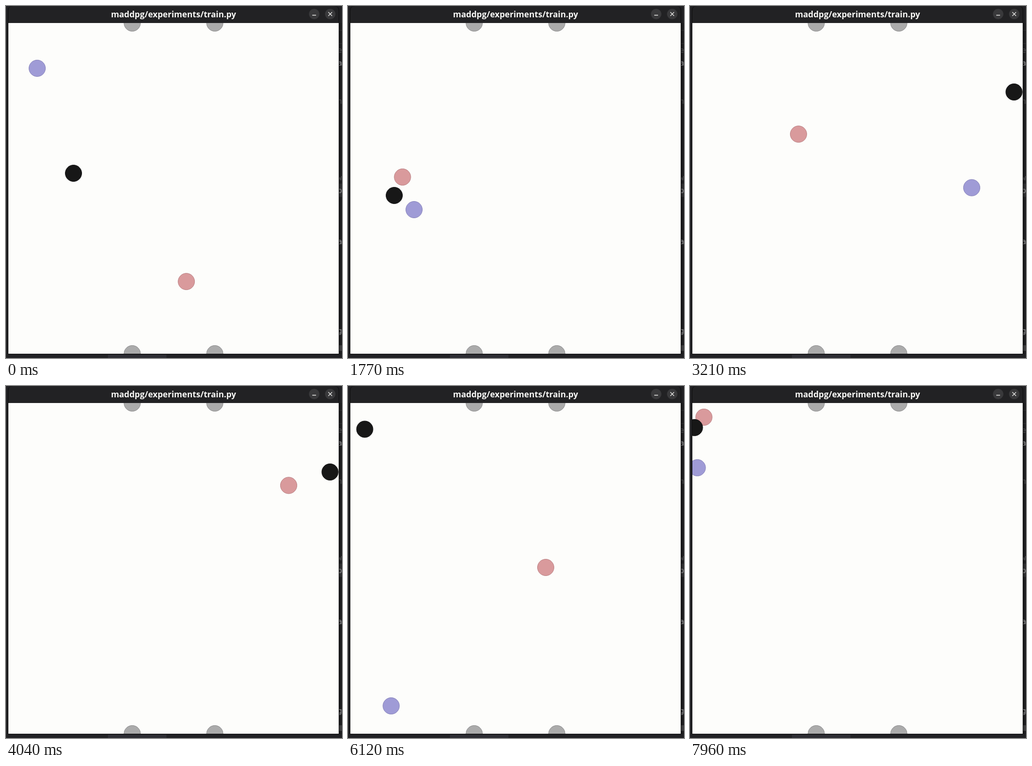
Recreate the animation shown at these times as an HTML page. Size 712 px wide and 745 px high, loop 8000 ms.

```html
<!DOCTYPE html>
<html lang="en">
<head>
<meta charset="utf-8">
<title>train.py</title>
<style>
  html, body { margin: 0; width: 100%; height: 100%; overflow: hidden; background: #212124; }
  svg { display: block; width: 712px; height: 745px; }
  .title { font: bold 17.6px "Open Sans", "Noto Sans", sans-serif; fill: #f7f7f5; text-anchor: middle; }
  .code { font: 15px "DejaVu Sans Mono", monospace; }
  .icon { stroke: #f2f2f0; stroke-width: 1.3; fill: none; }
</style>
</head>
<body>
<svg viewBox="0 0 712 745" xmlns="http://www.w3.org/2000/svg">
  <defs>
    <clipPath id="view"><rect x="5" y="36" width="700" height="700"/></clipPath>
  </defs>
  <rect width="712" height="745" fill="#212124"/>
  <rect x="706" y="36" width="6" height="701" fill="#1c1c1e"/>
  <rect x="706" y="376" width="6" height="28" fill="#2a2a2c"/>
  <rect x="706" y="718" width="6" height="12" fill="#3a3a3c"/>
  <path d="M706 51.5h6M706 79.5h6" stroke="#303032"/>
  <rect x="216" y="738" width="124" height="7" fill="#2d2d33"/>
  <g id="code" class="code"></g>

  <path d="M4 737V10Q4 0 14 0H696Q706 0 706 10V737Z" fill="#0b0b0c"/>
  <path d="M5 36V10Q5 0 15 0H695Q705 0 705 10V36Z" fill="#222224"/>
  <text class="title" x="355" y="24">maddpg/experiments/train.py</text>
  <circle cx="653" cy="17" r="11" fill="#39393b"/>
  <circle cx="687" cy="17" r="11" fill="#39393b"/>
  <path class="icon" d="M649 19.5h8M683 13l8 8M691 13l-8 8"/>

  <rect x="5" y="36" width="700" height="700" fill="#fdfdfb"/>
  <g id="field" clip-path="url(#view)"></g>
</svg>
<script>
const LOOP = 8000;
const LAG = 250; // ms an agent needs to reach full speed
const field = document.getElementById("field");

function add(parent, tag, attrs) {
  const node = document.createElementNS("http://www.w3.org/2000/svg", tag);
  for (const key in attrs) node.setAttribute(key, attrs[key]);
  return parent.appendChild(node);
}

function disc(x, y, fill, stroke) {
  return add(field, "circle", { cx: x, cy: y, r: 17.5, fill, stroke });
}

// Letters of the editor peeking out behind the window
for (const [ch, y, fill] of [
  ["e", 99, "#505052"], ["a", 126, "#929294"], ["n", 207, "#505052"], ["w", 369, "#505052"],
  ["p", 396, "#929294"], ["a", 504, "#929294"], ["g", 693, "#929294"]
]) add(document.getElementById("code"), "text", { x: 703, y, fill }).textContent = ch;

for (const x of [267.5, 442.5]) for (const y of [36, 736]) disc(x, y, "#ababab", "#8a8a8a");

const bodies = {
  purple: disc(0, 0, "#9f9bd6", "#8581b8"),
  red: disc(0, 0, "#d99a9c", "#b87f81"),
  ball: disc(0, 0, "#171717", "#171717")
};

// Each path: a start, the point of contact, then the drift after it, as [time, x, y]
const episodes = [
  { red: [[-200, 403, 606], [720, 177, 358], [1100, 150, 322], [1770, 115.5, 362], [2150, 52, 410], [2740, 80, 485]],
    purple: [[-200, 58.5, 99], [580, 124.5, 384], [1770, 140, 431], [2740, 122, 510]],
    ball: [[750, 143, 354], [1770, 98, 401], [2740, 84, 523]] },
  { red: [[2790, 115.7, 290], [4040, 644, 203], [5070, 678, 151], [5710, 687, 147]],
    purple: [[2790, 522.5, 472.3], [3650, 735, 222]],
    ball: [[4100, 686.6, 182], [5070, 708, 185.5]] },
  { red: [[5790, 476.5, 435.6], [7050, 80, 80], [7500, 50, 53], [7960, 29.5, 66]],
    purple: [[5790, 96.7, 757], [7150, 57, 152], [7960, 15.5, 173]],
    ball: [[7340, 35.5, 91.5], [7960, 9.5, 88]] }
];
const startOf = episode => episode.red[0][0];

// Distance covered from rest while approaching a steady speed
const launch = t => t - LAG * (1 - Math.exp(-t / LAG));

function place(path, t) {
  const next = path.findIndex(p => p[0] > t);
  if (next < 1) return path[next < 0 ? path.length - 1 : 0].slice(1);
  const [t0, x0, y0] = path[next - 1], [t1, x1, y1] = path[next];
  const u = (t - t0) / (t1 - t0);
  const k = next === 1 ? launch(t - t0) / launch(t1 - t0) : u * (1.4 - 0.4 * u);
  return [x0 + (x1 - x0) * k, y0 + (y1 - y0) * k];
}

// The view redraws in even steps between these moments, twice as often at first
const marks = [0, 580, 750, 1770, 3210, 5070, 6120, 7960, LOOP];

function hold(t) {
  const i = marks.findIndex(m => m > t);
  const a = marks[i - 1], length = marks[i] - a;
  const step = length / Math.ceil(length / (t < 750 ? 45 : 95));
  return a + Math.floor((t - a) / step + 1e-6) * step;
}

function draw(now) {
  const t = hold(now % LOOP);
  const episode = episodes.filter(e => startOf(e) <= t).pop();
  for (const name in bodies) {
    const [x, y] = place(episode[name], t);
    bodies[name].setAttribute("cx", x.toFixed(2));
    bodies[name].setAttribute("cy", y.toFixed(2));
  }
}

const began = performance.now();
function tick() {
  draw(performance.now() - began);
  requestAnimationFrame(tick);
}
tick();
</script>
</body>
</html>
```
